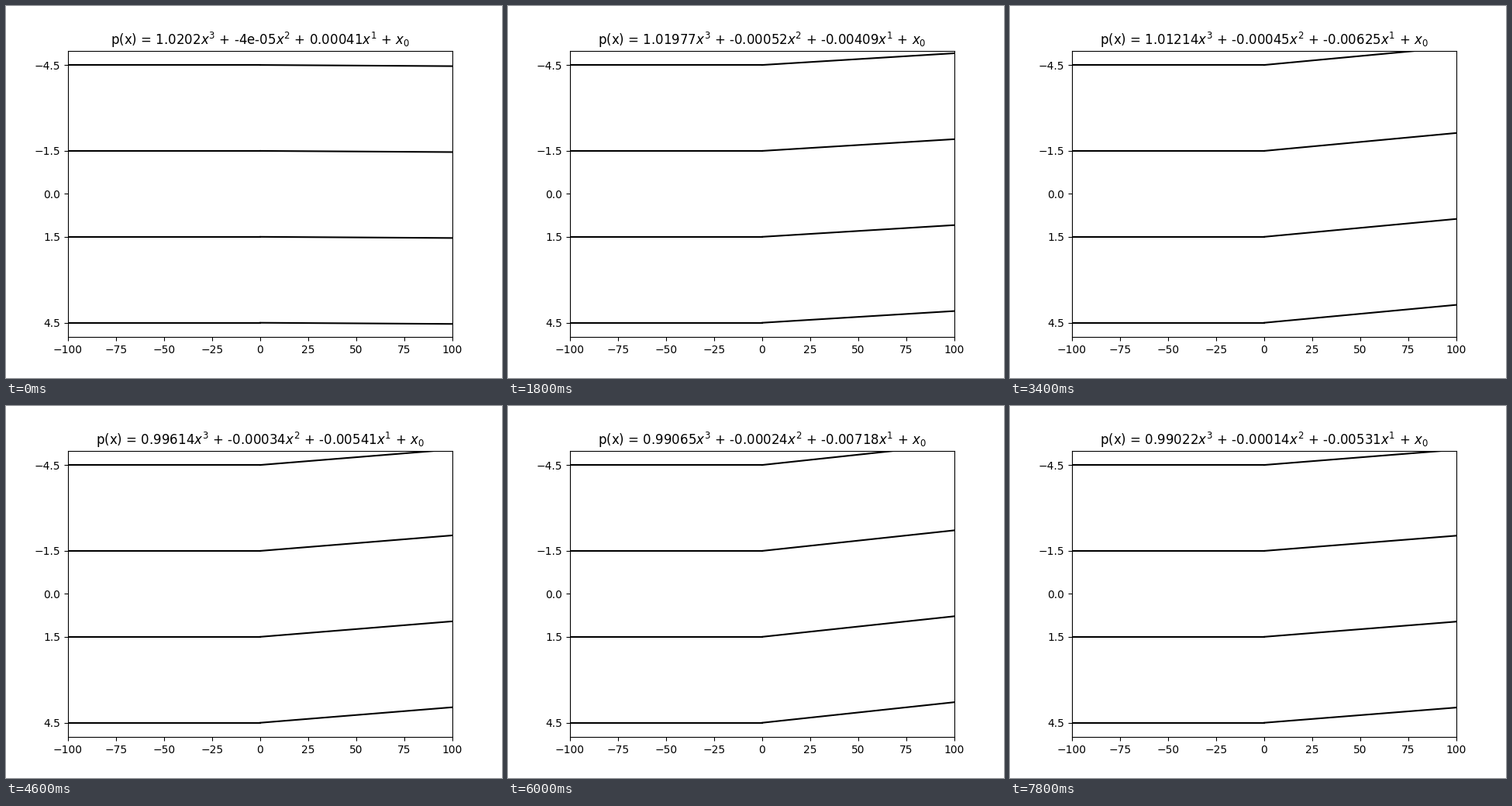
Recreate the animation shown at these times as a matplotlib script. Size 640x480 px, loop 8 s.

```python
import math
import matplotlib.pyplot as plt
from matplotlib.animation import FuncAnimation

STEP = 200      # ms per frame
FRAMES = 40
LEVELS = (-4.5, -1.5, 1.5, 4.5)


def smoothstep(x):
    x = min(max(x, 0), 1)
    return x * x * (3 - 2 * x)


def coefficients(t):
    """Polynomial coefficients after t seconds."""
    # Slow drop from just above one to just below it
    cubic = 1.00521 - 0.015 * math.tanh(t - 3.9)
    # Short dip that decays back towards zero
    square = -4e-5 - 0.00066 * t * math.exp(-t / 2)
    # Almost flat, then easing into a swing around a steady slope
    swing = -0.0062 - 0.001 * math.cos(2 * math.pi * (t - 2.6) / 3.3)
    mix = smoothstep((t - 0.5) / 2.1)
    linear = 0.00041 * (1 - mix) + swing * mix
    return [round(k, 5) for k in (cubic, square, linear)]


fig, ax = plt.subplots(figsize=(6.4, 4.8), dpi=100)
ax.set_xlim(-100, 100)
ax.set_ylim(5, -5)
ax.set_yticks(sorted((*LEVELS, 0)))
title = ax.set_title("", pad=5.28)

# Flat lanes on the left, tilting lanes on the right
style = dict(color="black", lw=1.5)
for y in LEVELS:
    ax.plot([-100, 0], [y, y], **style)
lanes = [ax.plot([0, 100], [y, y], **style)[0] for y in LEVELS]


def draw(i):
    a, b, c = coefficients(i * STEP / 1000)
    for lane, y in zip(lanes, LEVELS):
        lane.set_ydata([y, y + 100 * c])
    title.set_text(f"p(x) = {a}$x^3$ + {b}$x^2$ + {c}$x^1$ + $x_0$")
    return [*lanes, title]


anim = FuncAnimation(fig, draw, frames=FRAMES, interval=STEP,
                     repeat=True, repeat_delay=0, blit=False)
plt.show()
```
